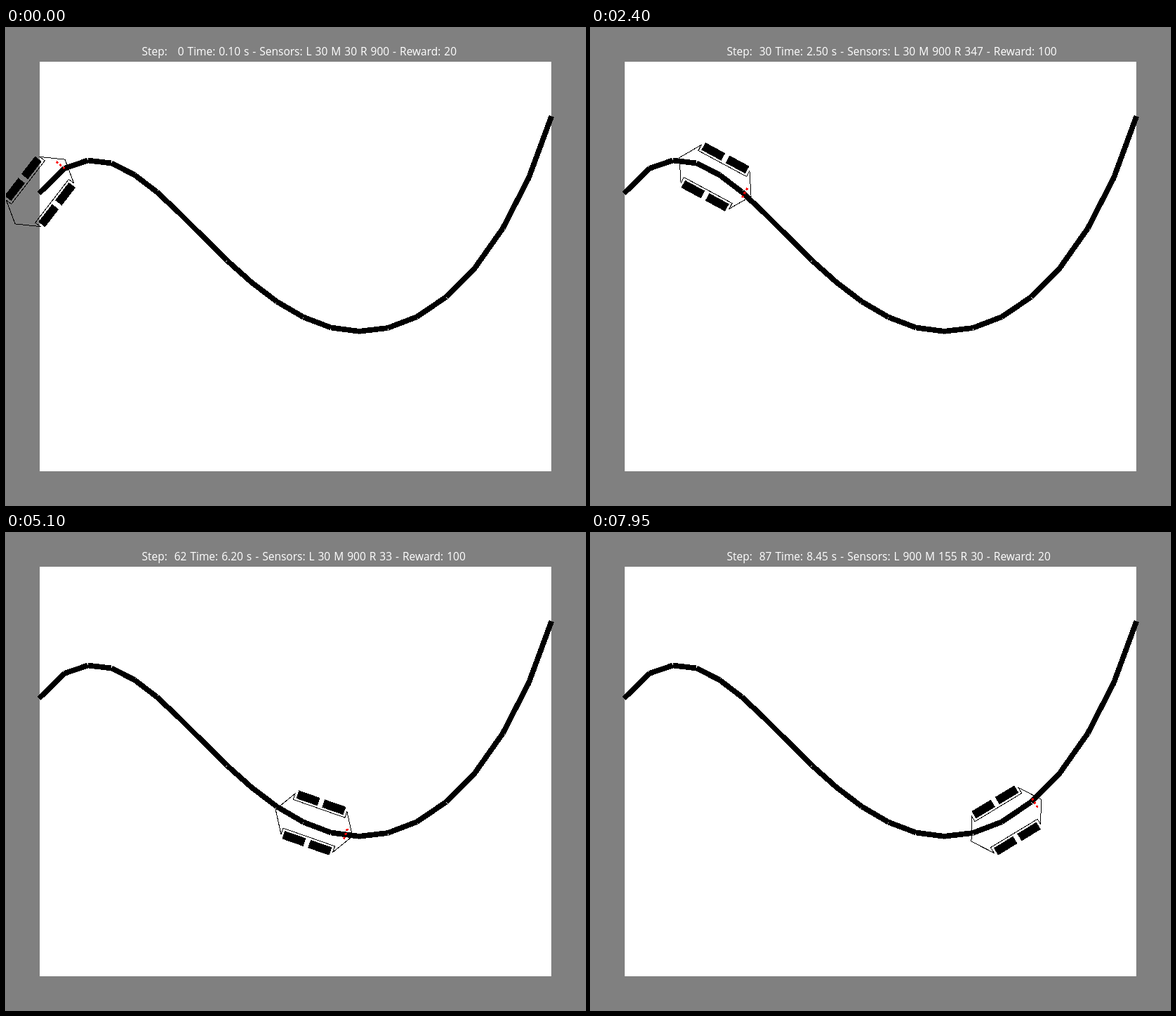
Recreate the animation shown at these times as an HTML page. Size 825x679 px, loop 8 s.

```html
<!DOCTYPE html>
<html lang="en">
<head>
<meta charset="utf-8">
<title>Line follower</title>
<style>
  html, body { margin: 0; width: 100%; height: 100%; overflow: hidden; background: #808080; }
  svg { display: block; width: 825px; height: 679px; }
  text { font: 15.5px "Open Sans", sans-serif; word-spacing: 0.95px; fill: #fff; white-space: pre; }
</style>
</head>
<body>
<svg viewBox="0 0 825 679">
  <g shape-rendering="crispEdges">
    <rect width="825" height="679" fill="#808080"/>
    <rect x="48" y="48" width="729" height="583" fill="#fff"/>
    <path id="track" fill="none" stroke="#000" stroke-width="7.7"/>
    <g id="robot">
      <path id="body" fill="none" stroke="#000" stroke-width="1"/>
      <path id="wheels"/>
      <path id="dots" fill="#f00"/>
    </g>
  </g>
  <text id="status" x="193.5" y="39"></text>
</svg>
<script>
const LOOP = 8000;
const SENSOR_X = 47.8, SENSOR_GAP = 6.2;
const SIDES = [-1, 1], SENSORS = [-1, 0, 1];

const el = id => document.getElementById(id);
const clamp = (v, lo, hi) => Math.min(hi, Math.max(lo, v));

// Control points of the track; the outer two only steer its ends
const control = [
  [-38, 405], [47.2, 235.3], [116.5, 188.5], [183, 209], [247, 263.5], [315, 331], [386, 389.5],
  [463, 426.5], [544, 427], [627, 383], [708, 285], [777.3, 125.5], [821, -97]
];

// Each span gets one extra vertex: the Catmull-Rom midpoint
const track = control.slice(1, -1).flatMap((p, i, inner) => {
  if (i === inner.length - 1) return [p];
  const [a, b, c, d] = control.slice(i, i + 4);
  return [p, p.map((_, k) => (9 * (b[k] + c[k]) - a[k] - d[k]) / 16)];
});

// Waypoints of the drive, straight moves in between
const route = [
  { ms: 0,    step: 0,  clock: 0.1,  x: 48.5,  y: 233,   angle: -52.3 },
  { ms: 1100, step: 12, clock: 1.2,  x: 82,    y: 203.5, angle: -33 },
  { ms: 1400, step: 18, clock: 1.5,  x: 116.6, y: 196.5, angle: -5.6 },
  { ms: 2400, step: 30, clock: 2.5,  x: 177,   y: 212,   angle: 28.3 },
  { ms: 3550, step: 45, clock: 4.35, x: 309.5, y: 327.2, angle: 44.3 },
  { ms: 4500, step: 56, clock: 5.6,  x: 393.3, y: 399.9, angle: 28 },
  { ms: 5800, step: 70, clock: 7,    x: 499.7, y: 429.6, angle: 7.6 },
  { ms: 7950, step: 87, clock: 8.45, x: 591.6, y: 409,   angle: -31.2 }
];

// The state on the route where the given field has the given value
function routeAt(field, value) {
  const i = Math.max(1, route.findIndex(p => p[field] >= value));
  const a = route[i - 1], b = route[i];
  const f = (value - a[field]) / (b[field] - a[field]);
  return Object.fromEntries(Object.keys(a).map(k => [k, a[k] + (b[k] - a[k]) * f]));
}

const box = (cx, cy, w, h) => `M${cx - w / 2} ${cy - h / 2}h${w}v${h}h${-w}z`;

function drawShapes() {
  el("track").setAttribute("d", track.slice(1)
    .map((p, i) => `M${track[i]}L${p}`).join(""));
  el("body").setAttribute("d",
    "M-58 0L-39-30.7V-21.6H39V-30.7L58 0L39 30.7V21.6H-39V30.7Z");
  el("wheels").setAttribute("d", SIDES.flatMap(sx =>
    SIDES.map(sy => box(sx * 19.5, sy * 30.5, 32, 12))).join(""));
  el("dots").setAttribute("d", SENSORS
    .map(k => box(SENSOR_X, k * SENSOR_GAP, 3, 3)).join(""));
}

function distanceToTrack(x, y) {
  return Math.min(...track.slice(1).map(([bx, by], i) => {
    const [ax, ay] = track[i], dx = bx - ax, dy = by - ay;
    const f = clamp(((x - ax) * dx + (y - ay) * dy) / (dx * dx + dy * dy), 0, 1);
    return Math.hypot(x - ax - f * dx, y - ay - f * dy);
  }));
}

// 900 on the line, 30 beside it
function sense({ x, y, angle }) {
  const c = Math.cos(angle * Math.PI / 180), s = Math.sin(angle * Math.PI / 180);
  return SENSORS.map(k => {
    const v = k * SENSOR_GAP;
    const d = distanceToTrack(x + c * SENSOR_X - s * v, y + s * SENSOR_X + c * v);
    return Math.round(30 + 870 * clamp((5.2 - d) / 3, 0, 1));
  });
}

function rewardFor(l, m, r) {
  if (m > 800) return 100;
  return Math.max(l, r) > 500 ? 20 : 10;
}

function render(ms) {
  const tick = Math.min(Math.floor(ms / 50) * 50, 7950);
  const step = Math.floor(routeAt("ms", tick).step + 1e-6);
  const pose = routeAt("step", step);
  const [l, m, r] = sense(pose);
  const clock = (Math.round(pose.clock * 20) / 20).toFixed(2);
  el("robot").setAttribute("transform",
    `translate(${pose.x} ${pose.y}) rotate(${pose.angle})`);
  el("status").textContent =
    `Step: ${String(step).padStart(3)} Time: ${clock} s - Sensors: ` +
    `L ${l} M ${m} R ${r} - Reward: ${rewardFor(l, m, r)}`;
}

drawShapes();
render(0);
const start = performance.now();
(function loop() {
  render((performance.now() - start) % LOOP);
  requestAnimationFrame(loop);
})();
</script>
</body>
</html>
```
